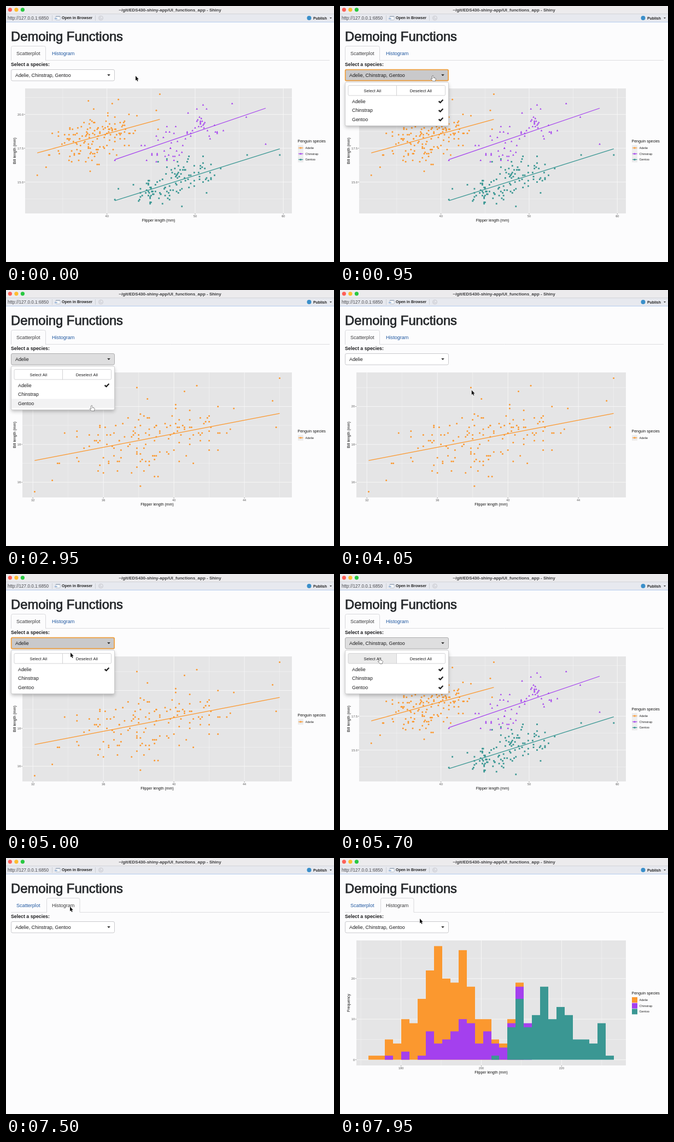
An HTML page with a canvas that plays this animation: 600 by 469 pixels, repeating every 8000 ms.

```html
<!DOCTYPE html>
<html lang="en">
<head>
<meta charset="utf-8">
<title>Demoing Functions</title>
<style>
html, body { margin: 0; width: 100%; height: 100%; overflow: hidden; background: #fcfcfd; }
canvas { display: block; width: 600px; height: 469px; }
</style>
</head>
<body>
<canvas id="stage" width="600" height="469"></canvas>
<script>
const ctx = document.getElementById('stage').getContext('2d');
const LOOP = 8000;
const FONT = '"Liberation Sans", Arial, sans-serif';
const INK = '#1c1c1e', LINK = '#1f57a0', PAGE = '#fcfcfd';

// ---------- drawing helpers ----------
function text(str, x, y, size, color = INK, align = 'left', weight = 400) {
  ctx.font = `${weight} ${size}px ${FONT}`;
  ctx.fillStyle = color;
  ctx.textAlign = align;
  ctx.fillText(str, x, y);
}
function rect(x, y, w, h, color) {
  ctx.fillStyle = color;
  ctx.fillRect(x, y, w, h);
}
function box(x, y, w, h, r, fill, stroke, width = 1) {
  ctx.beginPath();
  ctx.roundRect(x, y, w, h, r);
  if (fill) { ctx.fillStyle = fill; ctx.fill(); }
  if (stroke) { ctx.strokeStyle = stroke; ctx.lineWidth = width; ctx.stroke(); }
}
function line(x1, y1, x2, y2, color, width) {
  ctx.beginPath();
  ctx.moveTo(x1, y1);
  ctx.lineTo(x2, y2);
  ctx.strokeStyle = color;
  ctx.lineWidth = width;
  ctx.stroke();
}
function disc(x, y, r, color) {
  ctx.beginPath();
  ctx.arc(x, y, r, 0, 7);
  ctx.fillStyle = color;
  ctx.fill();
}
function triangle(x, y, halfWidth, height, color) {
  ctx.beginPath();
  ctx.moveTo(x - halfWidth, y);
  ctx.lineTo(x + halfWidth, y);
  ctx.lineTo(x, y + height);
  ctx.fillStyle = color;
  ctx.fill();
}

// ---------- data ----------
let seed = 29;
const random = () => (seed = (seed * 16807) % 2147483647) / 2147483647;
const gauss = () => 2 * (random() + random() + random() - 1.5);
const tenth = v => Math.round(v * 10) / 10;

// Two clusters around `mid`, `gap` apart, plus a few outliers
function scatter(count, mid, gap, spread, outliers) {
  const points = outliers.slice();
  while (points.length < count) {
    const side = points.length % 2 ? 0.5 : -0.5;
    points.push(mid.map((m, axis) => tenth(m + side * gap[axis] + spread[axis] * gauss())));
  }
  return points;
}

// Regression line: y = a + b * x between `from` and `to`
const species = [
  {
    name: 'Adelie', color: '#fb982f', from: 32.1, to: 46, a: 11.41, b: 0.1788,
    points: scatter(151, [38.8, 18.4], [3.1, 1.4], [1.6, 0.8],
      [[32.1, 15.5], [33.1, 16.1], [45.6, 20.3], [45.8, 18.9], [46, 21.5]])
  },
  {
    name: 'Chinstrap', color: '#a440ee', from: 40.9, to: 58, a: 7.57, b: 0.2222,
    points: scatter(68, [48.8, 18.4], [4.4, 1.6], [1.2, 0.62],
      [[40.9, 16.6], [54.2, 20.8], [55.8, 19.8], [58, 17.8]])
  },
  {
    name: 'Gentoo', color: '#3a9793', from: 40.9, to: 59.6, a: 5.25, b: 0.2048,
    points: scatter(123, [47.4, 15], [3.9, 1.4], [1.6, 0.5],
      [[40.9, 13.7], [51.3, 14.2], [55.9, 17], [59.6, 17]])
  }
];
const ALL = [0, 1, 2];

// Stack tops per bin, from the back layer to the front one
const BINS = 30;
const stacks = [
  { first: 0, tops: [1, 1, 5, 4, 10, 9, 15, 22, 28, 20, 19, 27, 18, 10, 10, 5, 4, 10, 19] },
  { first: 2, tops: [1, 0, 2, 0, 1, 7, 4, 5, 7, 10, 9, 4, 7, 4, 3, 9, 18, 9] },
  { first: 15, tops: [1, 0, 8, 15, 8, 11, 18, 10, 13, 11, 5, 5, 4, 9, 1] }
];

// ---------- charts ----------
const TOP = 151, BOTTOM = 380, RIGHT = 523;

// Maps lo..hi onto a..b with a 5% margin at both ends
function scale(lo, hi, a, b) {
  const k = (b - a) / ((hi - lo) * 1.1);
  return v => a + (v - lo + (hi - lo) * 0.05) * k;
}
// A step gives ticks at its multiples and faint lines halfway
function chart(left, xRange, xStep, yRange, yStep, yTitle) {
  return {
    left, xStep, yStep, yTitle,
    x: scale(...xRange, left, RIGHT),
    y: scale(...yRange, BOTTOM, TOP)
  };
}
const wide = chart(35, [32.1, 59.6], 10, [13.1, 21.5], 2.5, 'Bill length (mm)');
const narrow = chart(30, [32.1, 46], 4, [15.5, 21.5], 2, 'Bill length (mm)');
const bars = chart(30, [171.93, 232.97], 20, [0, 28], 10, 'Frequency');

function gridLines(step, toPixel, lo, hi, drawLine, drawTick) {
  for (let i = 0; i * step / 2 < 250; i++) {
    const value = i * step / 2, p = toPixel(value);
    if (p < lo || p > hi) continue;
    drawLine(p, i % 2 ? 0.4 : 0.8);
    if (i % 2 === 0) drawTick(value, p);
  }
}

function axes(c) {
  rect(c.left, TOP, RIGHT - c.left, BOTTOM - TOP, '#e5e5e6');
  gridLines(c.xStep, c.x, c.left, RIGHT, (p, w) => line(p, TOP, p, BOTTOM, '#fafafa', w), (v, p) => {
    line(p, BOTTOM, p, BOTTOM + 2, '#555', 0.6);
    text(v, p, 387.3, 5.6, '#555', 'center');
  });
  const digits = c.yStep % 1 ? 1 : 0;
  gridLines(c.yStep, c.y, TOP, BOTTOM, (p, w) => line(c.left, p, RIGHT, p, '#fafafa', w), (v, p) => {
    line(c.left - 2, p, c.left, p, '#555', 0.6);
    text(v.toFixed(digits), c.left - 3, p + 2, 5.6, '#555', 'right');
  });
  text('Flipper length (mm)', (c.left + RIGHT) / 2, 395, 7, '#111', 'center');
  ctx.save();
  ctx.translate(17.5, 265.5);
  ctx.rotate(-Math.PI / 2);
  text(c.yTitle, 0, 0, 7, '#111', 'center');
  ctx.restore();
}

function marker(kind, x, y, color) {
  if (kind === 0) disc(x, y, 1.5, color);
  else if (kind === 1) triangle(x, y + 1.2, 1.8, -3.2, color);
  else rect(x - 1.4, y - 1.4, 2.8, 2.8, color);
}

function legend(shown, filled) {
  const base = 250 + (3 - shown.length) * 5.4;
  text('Penguin species', 533.5, base, 7, '#111');
  shown.forEach((k, i) => {
    const { name, color } = species[k], y = base + 10 + i * 10.7;
    rect(534, y - 5, 10, 10, filled ? color : '#ebebec');
    if (!filled) {
      line(535, y, 543.5, y, color, 1.2);
      marker(k, 539, y, color);
    }
    text(name, 547.5, y + 2, 5.6, '#222');
  });
}

function scatterplot(shown) {
  const c = shown.length === 1 ? narrow : wide;
  axes(c);
  shown.forEach(k => species[k].points.forEach(([x, y]) =>
    marker(k, c.x(x), c.y(y), species[k].color)));
  shown.forEach(k => {
    const { a, b, from, to, color } = species[k];
    line(c.x(from), c.y(a + b * from), c.x(to), c.y(a + b * to), color, 1.3);
  });
  legend(shown, false);
}

function histogram() {
  axes(bars);
  const edge = i => Math.round(52.4 + i * 448.2 / BINS);
  stacks.forEach(({ first, tops }, k) => tops.forEach((n, i) => {
    const left = edge(first + i), y = bars.y(n);
    rect(left, y, edge(first + i + 1) - left, bars.y(0) - y, species[k].color);
  }));
  legend(ALL, true);
}

// ---------- window ----------
function chrome() {
  rect(0, 0, 600, 469, PAGE);
  rect(0, 0, 600, 15, '#ecebed');
  rect(0, 14, 600, 1, '#d3d3d8');
  rect(0, 15, 600, 14, '#e7e9ef');
  rect(0, 29, 600, 1, '#b4cbee');
  ['#fe5f57', '#febc2e', '#28c840'].forEach((color, i) => disc(7.4 + i * 11.5, 6.8, 3.6, color));
  text('~/git/EDS430-shiny-app/UI_functions_app - Shiny', 300, 10, 8, '#3c3c3e', 'center', 700);
  text('http://127.0.0.1:6850', 3, 24.6, 8.2, '#4c4c50');
  [84.5, 163.5].forEach(x => line(x, 17, x, 27, '#cdd0d6', 1));
  box(91, 18.5, 8, 7, 1, '#fff', '#a9b4c4', 0.8);
  rect(91, 18.5, 8, 1.6, '#a9b4c4');
  rect(89, 22.3, 5, 1.6, '#8fb0d8');
  text('Open in Browser', 102, 24.3, 7, '#222', 'left', 700);
  ctx.beginPath();
  ctx.arc(173.5, 22, 4, 0, 7);
  ctx.moveTo(175.4, 22);
  ctx.arc(173.5, 22, 1.9, 0, 5);
  ctx.strokeStyle = '#c3c5ca';
  ctx.lineWidth = 0.9;
  ctx.stroke();
  disc(554.5, 22, 4, '#3a8fca');
  text('Publish', 562, 24.5, 6.9, '#222', 'left', 700);
  triangle(594, 21, 2, 2.5, '#444');
}

function page(tab) {
  text('Demoing Functions', 9, 64, 23.8, '#24272a');
  ctx.strokeStyle = '#24272a';
  ctx.lineWidth = 0.75;
  ctx.strokeText('Demoing Functions', 9, 64);
  line(9, 99.5, 592, 99.5, '#dcdcdf', 1);
  const [x, w] = tab ? [74.5, 60.5] : [9.5, 63];
  box(x, 73.5, w, 30, [3, 3, 0, 0], PAGE, '#d8d8db');
  rect(x - 1, 100, w + 2, 5, PAGE);
  rect(x + 0.5, 99, w - 1, 1, PAGE);
  text('Scatterplot', 19, 90, 9.1, tab ? LINK : '#3a3a3c');
  text('Histogram', 84, 90, 9.1, tab ? '#3a3a3c' : LINK);
  text('Select a species:', 9, 109.6, 8.8, INK, 'left', 700);
}

function picker(shown, open, focus, hover) {
  const fill = focus ? '#c9c9cb' : open ? '#dededf' : hover ? '#e9e9ea' : '#fff';
  box(9.5, 116.5, 189, 20.5, 2.5, fill, open ? '#adadaf' : '#c9c9cc');
  if (focus) box(9.7, 116.7, 188.4, 20, 2, null, '#f0a040', 1.8);
  text(shown.map(k => species[k].name).join(', '), 17, 130, 8.9);
  triangle(188, 125.3, 2.8, 3, '#222');
}

function menu(shown, x, y) {
  ctx.save();
  ctx.shadowColor = 'rgba(0,0,0,.25)';
  ctx.shadowBlur = 6;
  ctx.shadowOffsetY = 3;
  box(9.5, 139.5, 189, 80, 2.5, '#fff');
  ctx.restore();
  box(9.5, 139.5, 189, 80, 2.5, null, '#c4c4c6', 0.8);
  ['Select All', 'Deselect All'].forEach((label, i) => {
    const left = 15 + i * 88.5;
    const hover = within(y, 145, 164) && within(x, left, left + 88.5);
    box(left, 145.5, 89, 18.5, i ? [0, 2, 2, 0] : [2, 0, 0, 2], hover ? '#ebebeb' : '#fff', '#cfcfd1', 0.9);
    text(label, left + 44.3, 157.6, 7.6, INK, 'center');
  });
  species.forEach(({ name }, k) => {
    const top = 166.5 + k * 16.5;
    if (within(x, 10, 198) && within(y, top, top + 16.5)) rect(10, top, 188, 16.5, '#f2f2f3');
    text(name, 22, top + 11.4, 8.9);
    if (shown.includes(k)) {
      line(180.6, top + 8, 184.2, top + 11, '#222', 2.3);
      line(183, top + 11, 188.4, top + 5.2, '#222', 2.3);
    }
  });
}

// ---------- pointer ----------
// Stops as [arrive, leave, x, y]
const stops = [
  [0, 300, 237, 128], [800, 1150, 170, 128], [1650, 2150, 155, 189], [2500, 3250, 157, 212],
  [3700, 3950, 250, 190], [4450, 4700, 163, 128], [5000, 5000, 118, 144], [5250, 5650, 70, 155],
  [6350, 6850, 272, 127], [7250, 7550, 117, 89], [7950, LOOP, 146, 111]
];
function pointerAt(t) {
  const i = stops.findIndex(s => t <= s[1]);
  const [arrive, , x, y] = stops[i];
  if (t >= arrive) return [x, y];
  const [, leave, x0, y0] = stops[i - 1];
  const u = (t - leave) / (arrive - leave), e = u * u * (3 - 2 * u);
  return [x0 + (x - x0) * e, y0 + (y - y0) * e];
}
const ARROW = new Path2D('M0 0V8.6L1.9 6.9 3.3 9.9 4.6 9.3 3.3 6.3H5.8Z');
const HAND = new Path2D('M-1 0H.6L.8 3.5 4.3 4.4 5 5.5 4.2 9.5H0L-3.4 6-2.8 5-.9 6Z');
function pointer(x, y, hand) {
  const shape = hand ? HAND : ARROW;
  ctx.save();
  ctx.translate(x, y);
  ctx.lineJoin = 'round';
  ctx.lineWidth = 1;
  ctx.strokeStyle = hand ? '#222' : '#fff';
  ctx.stroke(shape);
  ctx.fillStyle = hand ? '#fff' : '#111';
  ctx.fill(shape);
  ctx.restore();
}

// ---------- timeline ----------
const OPEN = 900, DROP_ONE = 1900, DROP_TWO = 2650, CLOSE = 3850;
const REOPEN = 4600, PICK_ALL = 5350, CLOSE_AGAIN = 6850, SWITCH_TAB = 7300, SHOW_BARS = 7600;
const PLOT_DELAY = 200;

function within(v, a, b) { return v >= a && v < b; }
function choiceAt(t) {
  if (within(t, DROP_ONE, DROP_TWO)) return [0, 2];
  return within(t, DROP_TWO, PICK_ALL) ? [0] : ALL;
}

function draw(t) {
  const [x, y] = pointerAt(t);
  const tab = t >= SWITCH_TAB ? 1 : 0;
  const open = within(t, OPEN, CLOSE) || within(t, REOPEN, CLOSE_AGAIN);
  const focus = within(t, OPEN, DROP_ONE) || within(t, REOPEN, PICK_ALL);
  const chosen = choiceAt(t);
  const overPicker = within(x, 9, 198) && within(y, 116, 137);
  const overMenu = open && within(x, 10, 198) && within(y, 145, 217);
  const overLink = !tab && within(x, 74, 135) && within(y, 74, 99);

  chrome();
  page(tab);
  if (!tab) scatterplot(choiceAt(t - PLOT_DELAY));
  else if (t >= SHOW_BARS) histogram();
  picker(chosen, open, focus, overPicker);
  if (open) menu(chosen, x, y);
  pointer(x, y, overPicker || overMenu || overLink);
}

const start = performance.now();
function tick() {
  draw((performance.now() - start) % LOOP);
  requestAnimationFrame(tick);
}
tick();
</script>
</body>
</html>
```
